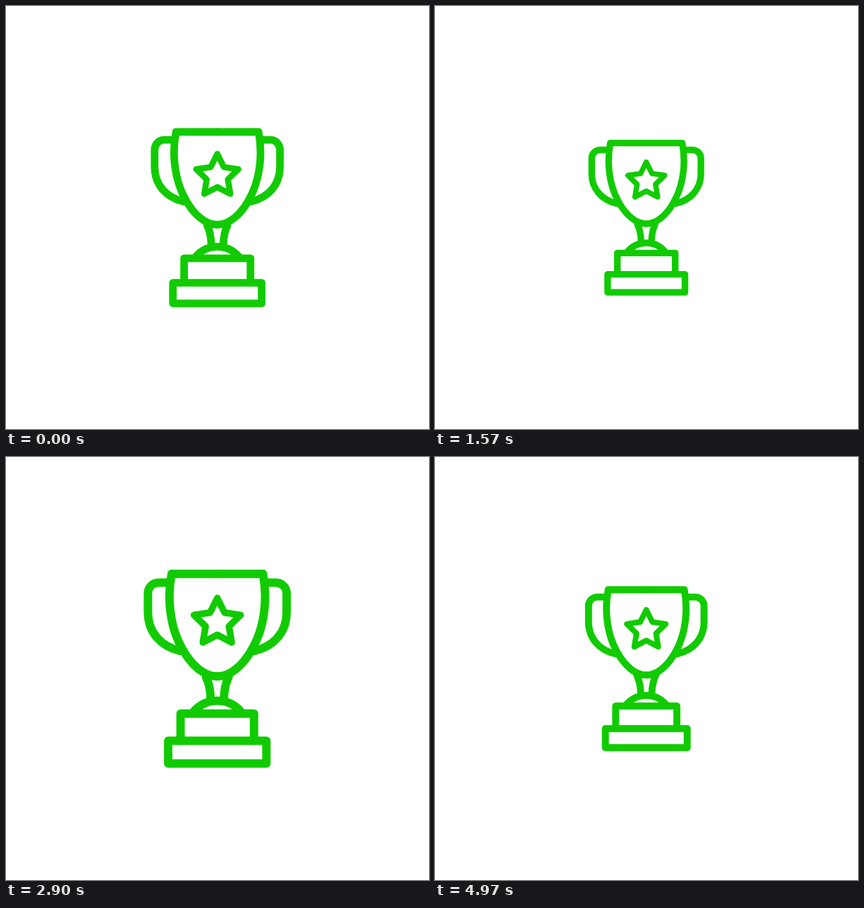
These frames come from a looping animation (600x600 px, 5010 ms). An HTML page:

```html
<!DOCTYPE html>
<html lang="en">
<head>
<meta charset="utf-8">
<title>Trophy pulse</title>
<style>
  html, body { margin: 0; width: 100%; height: 100%; overflow: hidden; background: #fff; }
  svg { display: block; width: 100vw; height: 100vh; }
</style>
</head>
<body>
<svg viewBox="0 0 600 600">
  <g id="trophy" fill="none" stroke="#11cb00" stroke-width="10.8" stroke-linejoin="round" stroke-linecap="round">
    <g id="side">
      <path d="M300 178.4H241.3C235.5 208 238.3 246 255.5 275.5C266.5 295.5 283 310.2 300 310.2"/>
      <path d="M238 189.7H224.5A13.6 13.6 0 0 0 210.9 203.3V228C210.9 253 227 271.5 252 277.3"/>
      <path d="M285.5 311Q291 322 291.5 339"/>
    </g>
    <use href="#side" transform="translate(600) scale(-1 1)"/>
    <path d="M270 355A40 40 0 0 1 330 355"/>
    <path d="M252.8 392.8V358H347.2V392.8"/>
    <rect x="236.9" y="392.8" width="126.2" height="29.3"/>
    <path id="star" stroke-width="8.6"/>
  </g>
</svg>
<script>
  const LOOP = 5010, FRAME = 100 / 3, LAST = 149;
  const PERIOD = 27, PEAK = 4.6, FALL = 16.4;
  const LOW = 0.868, HIGH = 1.15;
  const trophy = document.getElementById('trophy');

  function starPath(cx, cy, outer, inner) {
    const points = Array.from({ length: 10 }, (_, i) => {
      const r = i % 2 ? inner : outer, a = i * Math.PI / 5;
      return (cx + r * Math.sin(a)).toFixed(2) + ' ' + (cy - r * Math.cos(a)).toFixed(2);
    });
    return 'M' + points.join('L') + 'Z';
  }

  // Sharp peak: decelerating fall, then an accelerating rise.
  function pulse(frame) {
    const p = (frame - PEAK + PERIOD) % PERIOD;
    let level;
    if (p < FALL) {
      level = (1 - p / FALL) ** 2;
    } else {
      const u = (p - FALL) / (PERIOD - FALL);
      level = u * u * (2 - u);
    }
    return LOW + (HIGH - LOW) * level;
  }

  function render(ms) {
    const frame = Math.min(LAST, Math.floor((ms % LOOP + 5) / FRAME));
    const s = pulse(frame).toFixed(4);
    trophy.setAttribute('transform', `translate(299.7 300) scale(${s}) translate(-300 -300)`);
  }

  document.getElementById('star').setAttribute('d', starPath(300, 241, 31.5, 15.8));
  const start = performance.now();
  function tick() {
    render(performance.now() - start);
    requestAnimationFrame(tick);
  }
  tick();
</script>
</body>
</html>
```
